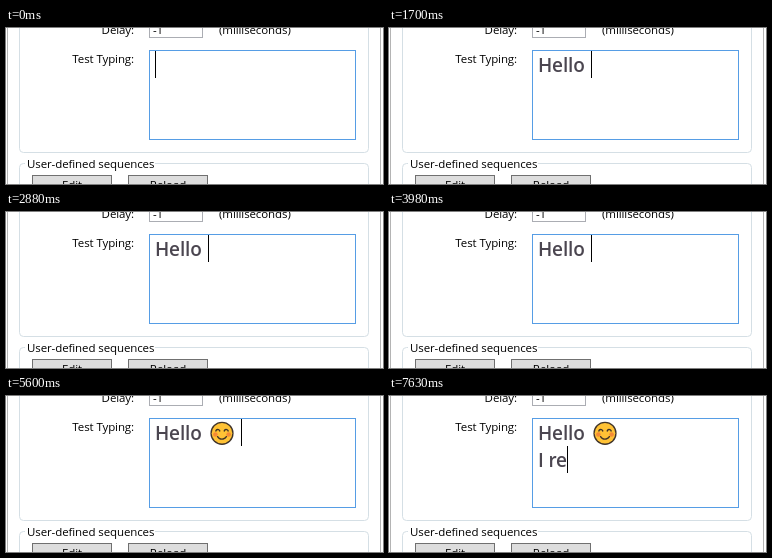
Write an HTML page with a canvas that moves like this. It is 377 px wide and 156 px high and loops after 8000 ms.

```html
<!DOCTYPE html>
<html lang="en">
<head>
<meta charset="utf-8">
<title>Test typing</title>
<style>
  html, body { margin: 0; width: 100%; height: 100%; overflow: hidden; background: #fff; }
  canvas { display: block; }
</style>
</head>
<body>
<canvas id="stage" width="377" height="156"></canvas>
<script>
const ctx = document.getElementById("stage").getContext("2d");
const LOOP = 8000;
const LINE = 27;

// Each step: start time, first line, face, second line, caret x (0 = hidden), caret line
const steps = [
  [0, "", "", "", 149, 0],
  [460, "", "", "", 0, 0],
  [840, "H", "", "", 163, 0],
  [1070, "He", "", "", 174, 0],
  [1150, "Hel", "", "", 179, 0],
  [1300, "Hell", "", "", 184, 0],
  [1550, "Hello", "", "", 196, 0],
  [1700, "Hello", "", "", 202, 0],
  [1870, "Hello", "sad", "", 229, 0],
  [2420, "Hello", "sad", "", 0, 0],
  [2880, "Hello", "", "", 202, 0],
  [3430, "Hello", "", "", 0, 0],
  [3980, "Hello", "", "", 202, 0],
  [4050, "Hello", "happy", "", 229, 0],
  [4680, "Hello", "happy", "", 0, 0],
  [5140, "Hello", "happy", "", 229, 0],
  [5600, "Hello", "happy", "", 235, 0],
  [6150, "Hello", "happy", "", 0, 0],
  [6300, "Hello", "happy", "", 229, 0],
  [6530, "Hello", "happy", "", 149, 1],
  [7080, "Hello", "happy", "I ", 160, 1],
  [7630, "Hello", "happy", "I re", 178, 1]
];

function rect(x, y, w, h, color) {
  ctx.fillStyle = color;
  ctx.fillRect(x, y, w, h);
}

function frame(x, y, w, h, border, fill) {
  rect(x, y, w, h, border);
  rect(x + 1, y + 1, w - 2, h - 2, fill);
}

function label(text, x, y, align = "left") {
  ctx.font = '11.5px "Open Sans", "Noto Sans", sans-serif';
  ctx.letterSpacing = "-0.1px";
  ctx.textAlign = align;
  ctx.fillStyle = "#000";
  ctx.fillText(text, x, y);
}

function typed(text, line) {
  ctx.font = '600 19px "Open Sans", "Noto Sans", sans-serif';
  ctx.letterSpacing = "-0.15px";
  ctx.textAlign = "left";
  ctx.fillStyle = "#4b4650";
  ctx.fillText(text, 149, 44 + line * LINE);
}

function groupBox(y, h) {
  ctx.strokeStyle = "#d5dfe5";
  ctx.lineWidth = 1;
  ctx.beginPath();
  ctx.roundRect(13.5, y + 0.5, 349, h, 4);
  ctx.stroke();
}

function disc(x, y, r, color) {
  ctx.fillStyle = color;
  ctx.beginPath();
  ctx.arc(x, y, r, 0, Math.PI * 2);
  ctx.fill();
}

function arc(x, y, r, from, to) {
  ctx.beginPath();
  ctx.arc(x, y, r, from * Math.PI, to * Math.PI);
  ctx.stroke();
}

function face(mood) {
  const x = 216, y = 37.3, ink = "#3f3329";
  disc(x, y, 11.6, ink);
  disc(x, y, 10.3, "#ffc235");
  ctx.strokeStyle = ink;
  ctx.lineWidth = 1.4;
  ctx.lineCap = "round";
  if (mood === "sad") {
    for (const side of [-1, 1]) disc(x + side * 4, y - 2.6, 1.5, ink);
    arc(x, y + 8.2, 5.6, 1.2, 1.8);
  } else {
    for (const side of [-1, 1]) {
      disc(x + side * 6.6, y + 1.2, 2.3, "#f58a35");
      arc(x + side * 4.2, y - 1.7, 2.1, 1.1, 1.9);
    }
    arc(x, y + 0.6, 5.2, 0.18, 0.82);
  }
  ctx.lineCap = "butt";
}

function drawForm() {
  rect(0, 0, 377, 156, "#fff");
  rect(1, 0, 1, 156, "#b4b4b4");
  rect(374, 0, 1, 156, "#b4b4b4");

  groupBox(-20, 144);
  label("Delay:", 128, 6, "right");
  frame(143, -12, 54, 22, "#abadb3", "#fff");
  label("-1", 147, 6);
  label("(milliseconds)", 213, 6);
  label("Test Typing:", 128, 35, "right");
  frame(143, 22, 207, 90, "#569de5", "#fff");

  groupBox(135, 60);
  rect(19, 130, 130, 12, "#fff");
  label("User-defined sequences", 21, 139.5);
  frame(26, 147, 80, 22, "#707070", "#ddd");
  frame(122, 147, 80, 22, "#707070", "#ddd");
  label("Edit", 66, 161, "center");
  label("Reload", 162, 161, "center");
}

function draw(now) {
  const t = now % LOOP;
  const [, first, mood, second, caret, line] = steps.findLast(s => s[0] <= t);
  drawForm();
  typed(first, 0);
  typed(second, 1);
  if (mood) face(mood);
  if (caret) rect(caret, 23 + line * LINE, 1, LINE, "#000");
}

const start = performance.now();
function tick() {
  draw(performance.now() - start);
  requestAnimationFrame(tick);
}
tick();
</script>
</body>
</html>
```
